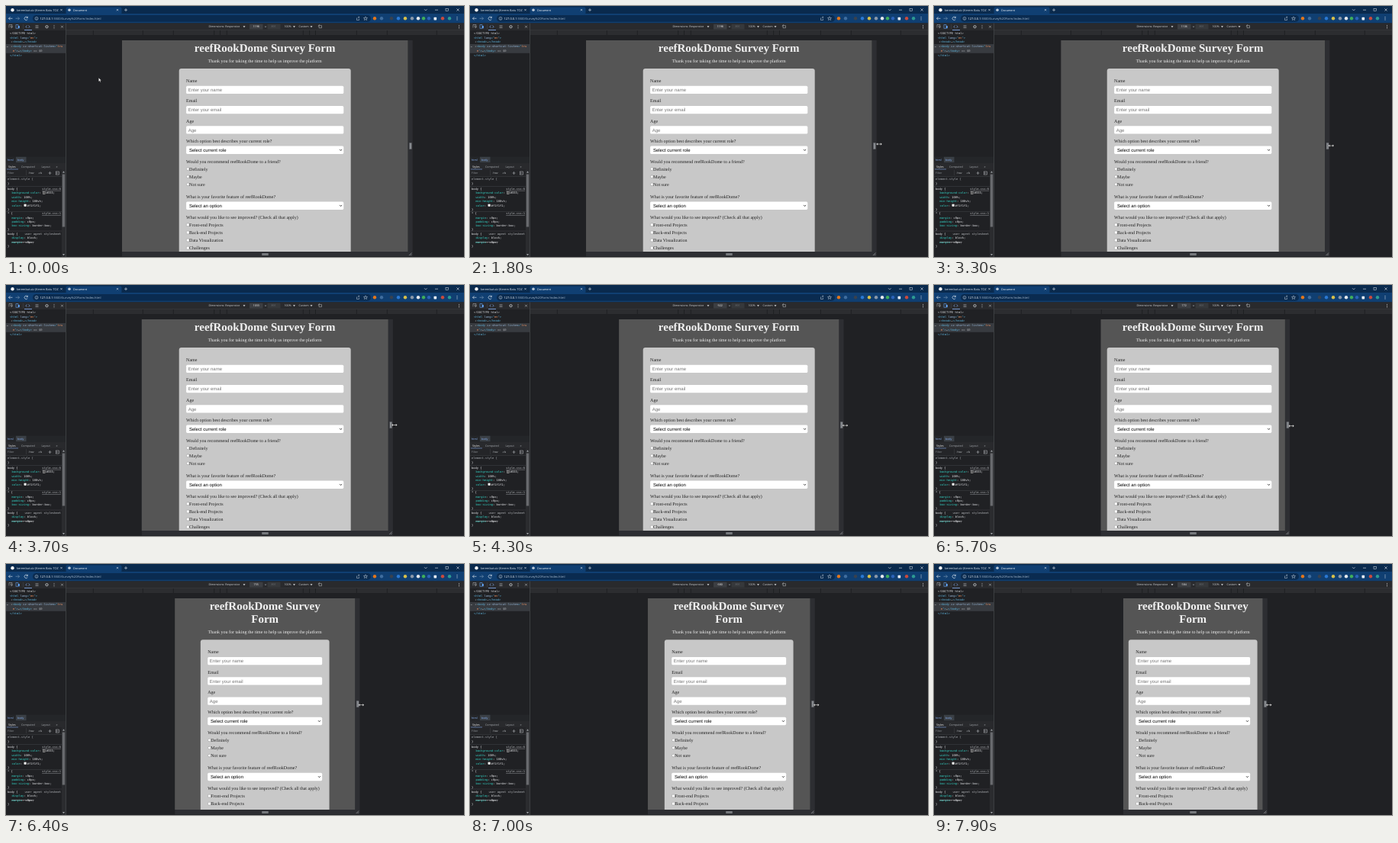
An HTML page that plays this animation: 600x329 px, repeating every 8000 ms.

```html
<!DOCTYPE html>
<html lang="en">
<head>
<meta charset="utf-8">
<style>
  html, body { margin: 0; width: 100%; height: 100%; overflow: hidden; background: #202124; }
  svg { display: block; width: 600px; height: 329px; }
  text { white-space: pre; text-rendering: geometricPrecision; }
  .ui { font-family: "Open Sans", sans-serif; }
  .mono { font: 3.75px "DejaVu Sans Mono", monospace; }
  .serif { font-family: "Liberation Serif", serif; }
  .sans { font-family: "Liberation Sans", sans-serif; }
</style>
</head>
<body>
<svg id="stage" viewBox="0 0 600 329"></svg>
<script>
const DURATION = 8000, STEP = 100;
const CENTER = 339.2, SCALE = 0.3125, TOP = 45, BOTTOM = 322;

const rect = (x, y, w, h, fill, extra = '') =>
  `<rect x="${x}" y="${y}" width="${w}" height="${h}" fill="${fill}" ${extra}/>`;
const dot = (x, y, r, fill) => `<circle cx="${x}" cy="${y}" r="${r}" fill="${fill}"/>`;
const line = (d, stroke, width = 0.6) =>
  `<path d="${d}" fill="none" stroke="${stroke}" stroke-width="${width}"/>`;
const text = (cls, x, y, size, fill, content, extra = '') =>
  `<text class="${cls}" x="${x}" y="${y}" font-size="${size}" fill="${fill}" ${extra}>${content}</text>`;
const ui = (x, y, content, fill = '#d5d7da', size = 3.6) => text('ui', x, y, size, fill, content);
const mono = (x, y, content, fill = '#e8eaed', extra = '') => text('mono', x, y, 3.75, fill, content, extra);
const span = (fill, content) => `<tspan fill="${fill}">${content}</tspan>`;
const cross = (x, y, r, fill = '#dfe5ec') =>
  line(`M${x - r} ${y - r}l${2 * r} ${2 * r}m0 ${-2 * r}l${-2 * r} ${2 * r}`, fill);
const dots = (x, y, fill = '#d5d7da') => [-1.7, 0, 1.7].map(d => dot(x, y + d, 0.5, fill)).join('');
const caret = (x, y, fill = '#d5d7da') => `<path d="M${x} ${y}h3l-1.5 2z" fill="${fill}"/>`;

function browserBar() {
  const icons = [
    [483, '#e2761b'], [492, '#3f6d9e'], [505, '#39424e'], [514, '#2a78d2'], [523, '#d8c04a'],
    [532, '#8b98a8'], [540, '#e4e8ec'], [547, '#3fae5a'], [554, '#2c63b8'], [572, '#c94a3d'], [581, '#2d9a92']
  ];
  return rect(0, 0, 600, 11, '#0a2a4d') + rect(0, 10, 600, 12.5, '#103f72') +
    rect(78.5, 1.5, 73, 9.5, '#103f72', 'rx="2"') +
    dot(8.5, 5.2, 2.2, '#f2f4f6') +
    ui(14, 6.7, 'kerembatutz (Kerem Batu TOZ', '#dbe4ee', 3.9) +
    rect(69, 1, 9, 9, '#0a2a4d') + cross(72.5, 5.2, 1.1) +
    dot(83, 5.2, 1.8, '#b9c7d6') + ui(88, 6.7, 'Document', '#fff', 3.7) +
    cross(146, 5.2, 1.1) + line('M155 5.2h4m-2-2v4', '#dfe5ec') +
    line('M548 4.2l1.8 1.8 1.8-1.8M562 5.2h4', '#dfe5ec') +
    rect(576, 3.3, 3.4, 3.4, 'none', 'stroke="#dfe5ec" stroke-width=".5"') + cross(592, 5, 1.6) +
    line('M8.5 16.3h-5m2-2l-2 2 2 2', '#eef3f8') + line('M12.5 16.3h5m-2-2l2 2-2 2', '#7f9ab8') +
    line('M28.2 15.2a2.2 2.2 0 1 0 .1 2.1m0-3.6v1.9h-1.9', '#eef3f8') +
    rect(35, 12, 443, 8.8, '#0a2b50', 'rx="4.4"') +
    line('M40 16.2v1.8m0-3v.5M42 16.4a2 2 0 1 0-4 0a2 2 0 1 0 4 0', '#dbe4ee', 0.45) +
    ui(44.5, 17.9, `127.0.0.1${span('#a9bdd2', ':5500/Survey%20Form/index.html')}`, '#fff', 4) +
    line('M459.5 15.5v3h3v-2m-1.8-.3l2-2m-1.4 0h1.4v1.4', '#dbe4ee', 0.45) +
    `<path d="M471 13.8l.7 1.7 1.8.1-1.4 1.1.5 1.8-1.6-1-1.6 1 .5-1.8-1.4-1.1 1.8-.1z" fill="none" stroke="#dbe4ee" stroke-width=".45"/>` +
    icons.map(([x, fill]) => dot(x, 16.3, 2.2, fill)).join('') +
    rect(560.5, 14.8, 3.6, 3.6, '#eef3f8', 'rx=".6"') + dots(591, 16.3, '#eef3f8');
}

function deviceBar() {
  const breakpoints = [320, 375, 425, 768, 1024, 1440];
  return rect(0, 22.5, 600, 9.5, '#292a2d') + rect(79, 32, 521, 6, '#2c2d30') +
    breakpoints.flatMap(w => [-1, 1].map(s =>
      rect(CENTER + s * w * SCALE / 2 - 0.3, 32, 0.6, 6, '#17181a'))).join('') +
    rect(79, 31.6, 521, 0.4, '#45474b') +
    ui(265.5, 28.4, 'Dimensions: Responsive') + caret(310.5, 26.2) +
    rect(319, 23.7, 17.5, 6.8, '#3c3e42', 'rx=".6"') + cross(340, 27.2, 0.8, '#9aa0a6') +
    rect(342.5, 23.7, 17, 6.8, '#36383b', 'rx=".6"') + ui(347.5, 28.4, '891', '#707479') +
    ui(364.5, 28.4, '100%') + caret(376, 26.2) + ui(383.5, 28.4, 'Custom') + caret(398.5, 26.2) +
    line('M410 28.7h3.5v-3h-3.5zm-.8-2a2.4 2.4 0 0 1 2-2.3', '#d5d7da', 0.45) + dots(593.5, 27.2);
}

function inspector() {
  const tag = '#5db0d7', attr = '#9bbbdc', value = '#f29766', prop = '#35d4c7';
  const rule = (y, selector, source) => mono(2, y, `${selector} {`) +
    mono(72, y, source, '#b4b7bb', 'text-anchor="end"' + (source[0] === 's' ? ' text-decoration="underline"' : ' font-style="italic"'));
  const decl = (y, name, val, extra) => mono(7.5, y, `${span(prop, name)}: ${val}`, '#e8eaed', extra);
  const swatch = (x, y, fill) => rect(x, y, 2.8, 2.8, fill, 'stroke="#ddd" stroke-width=".4"');
  return rect(0, 32, 78, 297, '#202124') + rect(0, 50, 78, 11.8, '#383b40') +
    line('M4 28.5V24.5h4v1.5M6 26l3 1.2-1.3.5-.5 1.3z', '#b9bdc1', 0.5) +
    rect(13, 24.7, 3, 4.5, 'none', 'stroke="#63a4f5" stroke-width=".6"') + rect(16, 26, 1.8, 3.2, '#63a4f5') +
    rect(22, 24, 0.4, 6.3, '#505257') + line('M27.5 25.5l-1.7 1.7 1.7 1.7m2-3.4l1.7 1.7-1.7 1.7', '#8ab4f8') +
    rect(24, 31.2, 10, 0.8, '#8ab4f8') + line('M38.5 25.7h4m-4 1.5h4m-4 1.5h4', '#b9bdc1', 0.5) +
    `<circle cx="53.5" cy="27.2" r="1.6" fill="none" stroke="#b9bdc1" stroke-width="1"/>` +
    dots(63, 27.2, '#b9bdc1') + cross(73.5, 27.2, 1.4, '#b9bdc1') +
    mono(5, 36.9, '&lt;!DOCTYPE html&gt;', '#d5d7da') +
    mono(5, 42.6, `&lt;html ${span(attr, 'lang')}="${span(value, 'en')}"&gt;`, tag) +
    mono(6.5, 48.3, `${span('#9aa0a6', '▸')}&lt;head&gt;${span('#d5d7da', '…')}&lt;/head&gt;`, tag) +
    mono(0.8, 54.2, '…', '#d5d7da') +
    mono(6.5, 54.2, `${span('#9aa0a6', '▸')}&lt;body ${span(attr, 'cz-shortcut-listen')}="${span(value, 'tru')}`, tag) +
    mono(9, 60, `${span(value, 'e')}"&gt;${span('#d5d7da', '…')}&lt;/body&gt;${span('#b4b7bb', ' == $0')}`, tag) +
    mono(5, 66.2, '&lt;/html&gt;', tag) +
    rect(0, 197.5, 78, 8, '#242629') + rect(13, 197.8, 13.5, 7.4, '#3b4046') +
    ui(2, 202.7, 'html', '#8ab4f8') + ui(15, 202.7, 'body', '#8ab4f8') +
    rect(0, 205.5, 78, 9, '#292a2d') + ui(3, 211.6, 'Styles', '#fff') + rect(1, 213.7, 15, 0.8, '#8ab4f8') +
    ui(20, 211.6, 'Computed', '#a8acb1') + ui(46.5, 211.6, 'Layout', '#a8acb1') + ui(65.5, 211.6, '»', '#a8acb1', 4.2) +
    rect(0, 214.5, 73, 8.5, '#242528') + ui(2, 220.4, 'Filter', '#90959a') + rect(26, 215, 0.4, 7, '#4a4c50') +
    ui(29.5, 220.4, ':hov', '#c5c8cc') + ui(42, 220.4, '.cls', '#c5c8cc') + line('M55.5 219h4m-2-2v4', '#c5c8cc', 0.5) +
    rect(65.3, 217, 4, 4, 'none', 'stroke="#c5c8cc" stroke-width=".5"') + line('M68.3 219h-2m.8-.8l-.8.8.8.8', '#c5c8cc', 0.4) +
    [223, 236.2, 269, 294.8].map(y => rect(0, y, 73, 0.4, '#4a4c50')).join('') +
    mono(2, 228.3, 'element.style {', '#a8acb1') + mono(2, 233.8, '}') +
    rule(240.9, 'body', 'style.css:6') +
    decl(246.4, 'background-color', '  #555;') + swatch(48.6, 243.7, '#555') +
    decl(251.8, 'width', '100%;') + decl(257.3, 'min-height', '100vh;') +
    decl(262.6, 'color', '  #f1f1f1;') + swatch(23.8, 259.9, '#f1f1f1') + mono(2, 268, '}') +
    rule(273.4, '*', 'style.css:1') + decl(278.6, 'margin', '▸0px;') + decl(283.6, 'padding', '▸0px;') +
    decl(288.6, 'box-sizing', 'border-box;') + mono(2, 293.6, '}') +
    rule(300, 'body', 'user agent stylesheet') + decl(305.3, 'display', 'block;') +
    decl(310.5, 'margin', '▸8px;', 'text-decoration="line-through"') + mono(2, 316, '}') +
    rect(73, 214.5, 5, 114.5, '#2b2c2f') + rect(73.7, 220.5, 3.5, 69, '#686a6e') +
    caret(74, 325, '#a8acb1') + `<path d="M74 218.5h3l-1.5-2z" fill="#a8acb1"/>` +
    rect(78, 22.5, 0.7, 306.5, '#4a4c50');
}

function surveyPage(narrow) {
  const width = (narrow ? 540 : 720) * SCALE, left = CENTER - width / 2;
  const x = left + 9.4, inner = width - 18.8, dark = '#202020';
  const centered = (y, size, content, extra = '') =>
    text('serif', CENTER, y, size, '#f1f1f1', content, 'text-anchor="middle" ' + extra);
  const label = (y, content, dx = 0) => text('serif', x + dx, y, 6, dark, content);
  const box = y => rect(x, y, inner, 10.4, '#fff', 'rx="1.6"');
  const input = (y, name, hint) => label(y, name) + box(y + 4.5) + text('sans', x + 2.6, y + 11.9, 6, '#757575', hint);
  const select = (y, name, hint) => label(y, name) + box(y + 4.5) + text('sans', x + 3.8, y + 11.9, 6, '#000', hint) +
    line(`M${x + inner - 5.2} ${y + 8.9}l1.5 1.6 1.5-1.6`, '#000', 0.7);
  const options = (y, names, radius) => names.map((name, i) => {
    const base = y + i * 10.1;
    return rect(x + 0.3, base - 3.8, 3.6, 3.6, '#fff', `rx="${radius}" stroke="#777" stroke-width=".35"`) + label(base, name, 4);
  }).join('');
  const title = narrow
    ? centered(59.5, 15, 'reefRookDome Survey', 'font-weight="bold"') + centered(76.8, 15, 'Form', 'font-weight="bold"')
    : centered(59.5, 15, 'reefRookDome Survey Form', 'font-weight="bold"');
  return title + `<g transform="translate(0 ${narrow ? 17.25 : 0})">` +
    centered(74.2, 6, 'Thank you for taking the time to help us improve the platform') +
    rect(left, 82, width, 260, '#c8c8c8', 'rx="3.1"') +
    input(100.2, 'Name', 'Enter your name') + input(126.4, 'Email', 'Enter your email') + input(152.7, 'Age', 'Age') +
    select(179, 'Which option best describes your current role?', 'Select current role') +
    label(205.6, 'Would you recommend reefRookDome to a friend?') +
    options(215.6, ['Definitely', 'Maybe', 'Not sure'], 1.8) +
    select(252, 'What is your favorite feature of reefRookDome?', 'Select an option') +
    label(278.7, 'What would you like to see improved? (Check all that apply)') +
    options(288.8, ['Front-end Projects', 'Back-end Projects', 'Data Visualization', 'Challenges'], 0.5) + '</g>';
}

const stage = document.getElementById('stage');
stage.innerHTML = `<clipPath id="view">${rect(79, TOP, 521, BOTTOM - TOP, '#fff')}</clipPath>` +
  rect(0, 0, 600, 329, '#202124') + browserBar() + deviceBar() + inspector() +
  `<text id="size" class="ui" x="327.7" y="28.4" font-size="3.6" fill="#fff" text-anchor="middle"></text>
  <rect id="frame" y="${TOP}" height="${BOTTOM - TOP + 6.3}" fill="#2d2e32"/>
  <rect id="body" y="${TOP}" height="${BOTTOM - TOP}" fill="#555"/>
  <g clip-path="url(#view)"><g id="wide">${surveyPage(false)}</g><g id="narrow">${surveyPage(true)}</g></g>` +
  rect(335, 324.2, 9, 2.6, '#55575b') + line('M335.5 324.8h8m-8 1.4h8', '#b4b7bb', 0.6) +
  `<g id="edge">${rect(1.9, 179, 3.2, 9, '#606267') + line('M2.9 180v7m1.4-7v7', '#c5c8cc', 0.5) +
    line('M1.5 327l3.5-3.5m-1.6 3.5l1.6-1.6', '#c5c8cc', 0.5)}</g>
  <path id="arrow" d="M0 0v5.2l1.2-1.1.9 1.9.9-.4-.9-1.9h1.7z" fill="#fff" stroke="#000" stroke-width=".35"/>
  <g id="resize">${line('M-3 0h6', '#000', 1.6) + line('M-3 0h6', '#fff', 0.7)}
    <path d="M-3.8 0l2-1.7v3.4zM3.8 0l-2-1.7v3.4z" fill="#fff" stroke="#000" stroke-width=".25"/></g>`;

const part = Object.fromEntries(
  ['size', 'frame', 'body', 'wide', 'narrow', 'edge', 'arrow', 'resize'].map(id => [id, document.getElementById(id)]));
const widthKeys = [[2400, 1198], [3300, 1106], [4200, 941], [4300, 922], [5100, 826], [5700, 772],
  [6000, 769], [6300, 768], [7000, 680], [7200, 662], [7900, 584]];

function viewportWidth(t) {
  const next = widthKeys.findIndex(key => key[0] >= t);
  if (next === 0) return widthKeys[0][1];
  const [t0, w0] = widthKeys[next - 1], [t1, w1] = widthKeys[next];
  return Math.round(w0 + (w1 - w0) * (t - t0) / (t1 - t0));
}

const place = (node, x, y) => node.setAttribute('transform', `translate(${x} ${y})`);
const show = (node, on) => node.style.display = on ? '' : 'none';

function draw(t) {
  const width = viewportWidth(t), w = width * SCALE, left = CENTER - w / 2, right = left + w;
  part.size.textContent = width;
  part.body.setAttribute('x', left);
  part.body.setAttribute('width', w);
  part.frame.setAttribute('x', left);
  part.frame.setAttribute('width', w + 6.3);
  place(part.edge, right, 0);
  show(part.wide, width >= 768);
  show(part.narrow, width < 768);

  const p = Math.min(1, t / 1700), ease = p * p * (3 - 2 * p);
  const resizing = t >= 1700;
  show(part.arrow, !resizing);
  show(part.resize, resizing);
  place(part.arrow, 121.3 + 412.7 * ease, 94 + 87 * ease);
  place(part.resize, right + (t < 1900 ? 9.6 : 8.2), t < 1900 ? 181 : Math.min(184.7, 181.7 + (t - 1900) / 1000));
}

function tick(now) {
  draw(Math.floor(now % DURATION / STEP) * STEP);
  requestAnimationFrame(tick);
}
requestAnimationFrame(tick);
</script>
</body>
</html>
```
